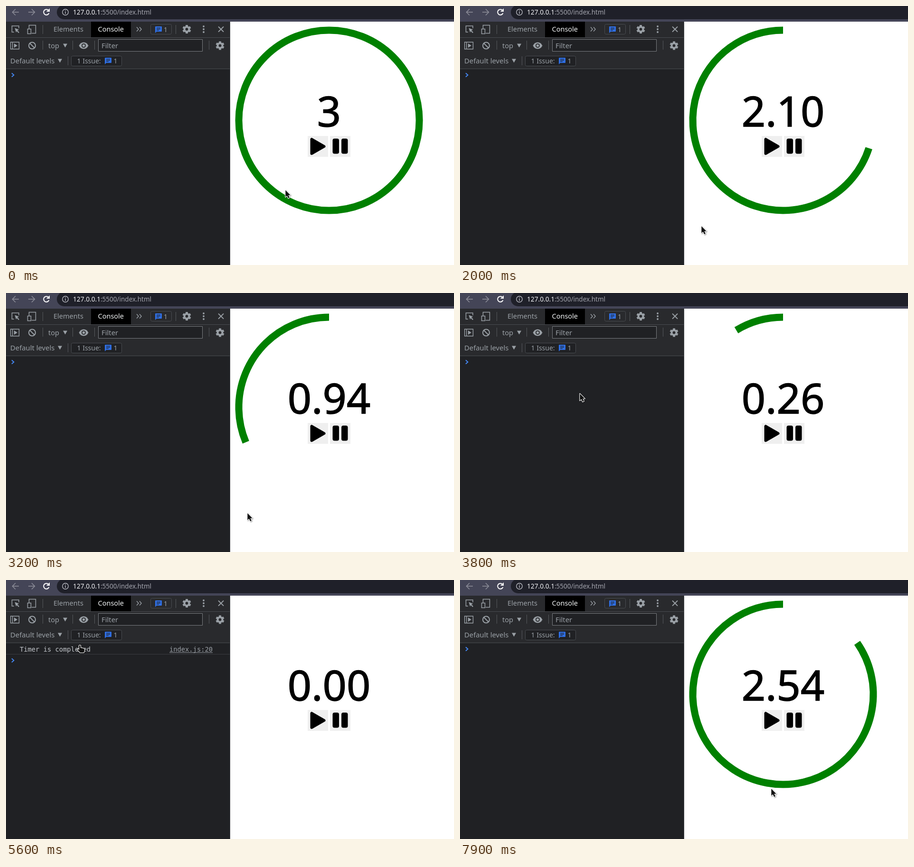
An HTML page with a canvas for the animation above (8 s loop, 943 px wide and 546 px high).

```html
<!DOCTYPE html>
<html lang="en">
<head>
<meta charset="utf-8">
<title>Countdown timer</title>
<style>
html, body { margin: 0; width: 100%; height: 100%; overflow: hidden; background: #202124; }
canvas { display: block; width: 943px; height: 546px; }
</style>
</head>
<body>
<canvas id="stage" width="943" height="546"></canvas>
<script>
const ctx = document.getElementById('stage').getContext('2d');
const LOOP = 8000, STEP = 100;
const FIRST = 1100, DONE = 4100, RELOAD = 6300, SECOND = 7440;
const SANS = '"Noto Sans", "Open Sans", sans-serif';
const MONO = '"DejaVu Sans Mono", monospace';
const GREY = '#9aa0a6', EDGE = '#494c50', DARK = '#202124', BLUE = '#2f6fe4';

// Countdown: ms since the click, seconds left
const COUNT = [[0, 3], [900, 2.1], [2100, 0.94], [2700, 0.26], [2960, 0]];
// Pointer moves: departure, arrival, x, y
const START = { x: 588, y: 388 };
const MOVES = [
  [100, 600, 641, 316], [700, 900, 646, 302], [FIRST, 2000, 508, 464],
  [3200, 3800, 252, 212], [3800, 4300, 160, 163], [4400, 4900, 87, 14],
  [5300, 5600, 154, 137], [5600, 5800, 221, 176], [5900, 6200, 87, 14],
  [RELOAD, 6500, 114, 74], [6500, 7200, 648, 300], [7400, 7900, 655, 440]
];

const mix = (a, b, k) => a + (b - a) * k;
const part = (t, from, to) => Math.min(1, Math.max(0, (t - from) / (to - from)));

function secondsLeft(ms) {
  let left = 3;
  for (let i = 1; i < COUNT.length; i++) {
    left = mix(left, COUNT[i][1], part(ms, COUNT[i - 1][0], COUNT[i][0]));
  }
  return Math.round(left * 50) / 50;
}

function pointerAt(t) {
  return MOVES.reduce((p, [from, to, x, y]) => {
    const k = part(t, from, to);
    return { x: mix(p.x, x, k), y: mix(p.y, y, k) };
  }, START);
}

function rect(x, y, w, h, color) {
  ctx.fillStyle = color;
  ctx.fillRect(x, y, w, h);
}

function paint(fill, stroke, width) {
  if (fill) { ctx.fillStyle = fill; ctx.fill(); }
  if (stroke) { ctx.strokeStyle = stroke; ctx.lineWidth = width; ctx.stroke(); }
}

function round(x, y, w, h, r, fill, stroke, width = 1) {
  ctx.beginPath();
  ctx.roundRect(x, y, w, h, r);
  paint(fill, stroke, width);
}

function line(points, color, width = 1.6) {
  ctx.beginPath();
  points.forEach(([x, y]) => ctx.lineTo(x, y));
  paint(null, color, width);
}

function circle(x, y, r, fill, stroke, width) {
  ctx.beginPath();
  ctx.arc(x, y, r, 0, Math.PI * 2);
  paint(fill, stroke, width);
}

function text(s, x, y, size, color, family = SANS, align = 'left') {
  ctx.font = size + 'px ' + family;
  ctx.textAlign = align;
  ctx.fillStyle = color;
  ctx.fillText(s, x, y);
}

function shape(d, x, y, fill, stroke, width) {
  const p = new Path2D(d);
  ctx.save();
  ctx.translate(x, y);
  ctx.lineJoin = 'round';
  if (stroke) { ctx.strokeStyle = stroke; ctx.lineWidth = width; ctx.stroke(p); }
  if (fill) { ctx.fillStyle = fill; ctx.fill(p); }
  ctx.restore();
}

// An open angle: two strokes of slope h/w meeting at x, y
function angle(x, y, w, h, color, width) {
  line([[x - w, y - h], [x, y], [x - w, y + h]], color, width);
}

function gear(x, y) {
  for (let i = 0; i < 6; i++) {
    ctx.save();
    ctx.translate(x, y);
    ctx.rotate(i * Math.PI / 3);
    rect(-2.4, -9, 4.8, 5, GREY);
    ctx.restore();
  }
  circle(x, y, 4.9, null, GREY, 4);
}

function bubble(x, y) {
  shape('M1 0H13Q14 0 14 1V10Q14 11 13 11H3L0 14V1Q0 0 1 0Z', x, y, BLUE);
  for (let i = 0; i < 3; i++) rect(x + 3, y + 2.5 + i * 2.5, i < 2 ? 8 : 5, 1.1, DARK);
}

function drop(x, y) {
  shape('M0 0H9L4.5 8Z', x, y, GREY);
}

function browserBar(hover) {
  rect(0, 0, 943, 33, '#444557');
  round(107, -2, 860, 30, 15, '#1f2029');
  for (const [x, dir] of [[20, 1], [54, -1]]) {
    line([[x + 7 * dir, 13], [x - 6 * dir, 13]], '#8c8d98');
    angle(x - 6.5 * dir, 13, -6.5 * dir, 6.5, '#8c8d98', 1.6);
  }
  if (hover) circle(85, 13, 13.5, '#686977');
  ctx.beginPath();
  ctx.arc(85, 13, 5.8, .35, Math.PI * 1.75);
  paint(null, '#fff', 2);
  shape('M7 -7V0H0Z', 85, 12, '#fff');
  circle(125, 13, 6.2, null, '#b9bac2', 1.4);
  rect(124.3, 12, 1.5, 4.5, '#b9bac2');
  rect(124.3, 9.3, 1.5, 1.6, '#b9bac2');
  text('127.0.0.1', 141, 18, 13.7, '#f1f1f4');
  const w = ctx.measureText('127.0.0.1').width;
  text(':5500/index.html', 141 + w, 18, 13.5, '#a3a4ad');
}

function panel() {
  rect(0, 33, 472, 513, DARK);
  rect(0, 33, 471, 99, '#292a2d');
  rect(179, 33, 84, 33, '#000');
  for (const y of [66, 132]) rect(0, y, 471, 1, EDGE);
  rect(471, 33, 1, 513, EDGE);
  [[77, 357], [77, 140, 186, 427], [130]].forEach((row, i) =>
    row.forEach(x => rect(x, 40 + i * 33, 1, 19, '#55585c')));
}

function tabRow() {
  line([[17, 55], [12.5, 55], [12.5, 42], [27, 42], [27, 47]], GREY, 1.5);
  shape('M0 0L9 3.5L5.5 5L9.5 9L8 10.5L4 6.5L2.8 9.5Z', 18.5, 46.5, GREY);
  line([[48.5, 48], [48.5, 40.5], [62.5, 40.5], [62.5, 57.5], [54, 57.5]], GREY, 1.5);
  round(45.5, 48.5, 7, 10, 0, null, GREY, 1.5);
  text('Elements', 100, 54, 14.5, GREY);
  text('Console', 193.5, 54, 14.5, '#f1f3f4');
  for (const x of [279, 285]) angle(x, 49, 4, 4.5, GREY, 1.4);
  round(304.5, 38.5, 44, 21, 3, null, EDGE);
  bubble(314, 43);
  text('1', 332, 54.5, 14, GREY);
  gear(380.5, 49);
  for (let i = -1; i < 2; i++) circle(416, 49 + i * 6, 1.9, GREY);
  for (const d of [-5.5, 5.5]) line([[452.5 - d, 43.5], [452.5 + d, 54.5]], GREY, 1.8);
}

function filterRow() {
  round(9.7, 76.2, 17.8, 14.6, 0, null, GREY, 1.4);
  rect(13, 76, 1.4, 15, GREY);
  shape('M0 0L7 4.5L0 9Z', 17, 79, GREY);
  circle(55, 83.5, 7, null, GREY, 2);
  line([[50, 78.5], [60, 88.5]], GREY, 2);
  text('top', 89, 88.5, 14.6, GREY);
  drop(120, 79.5);
  shape('M0 7Q3.5 0 10 0Q16.5 0 20 7Q16.5 14 10 14Q3.5 14 0 7Z', 153.5, 76.5, GREY);
  circle(163.5, 83.5, 4.5, '#292a2d');
  circle(163.5, 83.5, 2.7, GREY);
  round(194.5, 70.5, 219, 25, 0, DARK, '#7b7e82');
  text('Filter', 201, 89, 14.8, GREY);
  gear(450.5, 83.5);
}

function levelRow() {
  text('Default levels', 9, 121, 14.8, GREY);
  drop(109, 111.5);
  round(137.5, 105.5, 106, 21, 3, DARK, EDGE);
  text('1 Issue:', 149.5, 121, 14, GREY);
  bubble(208, 109);
  text('1', 226.5, 121, 14, GREY);
}

function consoleBody(logged) {
  if (logged) {
    text('Timer is completed', 29, 151, 13.75, '#c3c7cc', MONO);
    text('index.js:20', 435, 151, 13.75, GREY, MONO, 'right');
    rect(344, 152.5, 91, 1, GREY);
    rect(0, 156, 471, 1, '#3a3c40');
  }
  angle(16.5, logged ? 169.5 : 145.5, 4.5, 4, '#4488f5', 1.9);
}

function page(left) {
  rect(472, 33, 471, 513, '#fff');
  if (left > 0) {
    const top = -Math.PI / 2;
    ctx.beginPath();
    ctx.arc(680, 241, 190, top + (1 - left / 3) * Math.PI * 2, top + Math.PI * 2);
    paint(null, '#008000', 15);
  }
  const label = left === 3 ? '3' : left.toFixed(2);
  text(label, 680, 254, 88, '#000', SANS, 'center');
  ctx.strokeStyle = '#000';
  ctx.lineWidth = 1.4;
  ctx.strokeText(label, 680, 254);
  for (const x of [635, 682]) rect(x, 274, 43, 44, '#efefef');
  shape('M0 0V30L26 15Z', 643.5, 281, '#000', '#000', 6);
  for (const x of [687.5, 706]) round(x, 279.5, 13.5, 32, 4, '#000');
}

const ARROW = 'M.3 .3V14.7L3.6 11.7L6.2 17.3L8.8 16.1L6.3 10.7H10.7Z';
const HAND = 'M0 1.5Q1.5 -.5 3 1.5V6.5Q5 5.3 6 7Q8 6 9 7.6Q11 7.3 11 9.5V12Q11 14 9.5 16H2Q.5 13.5 -3.5 10.5Q-4 8.5 -2 8.7L0 10Z';

function pointer({ x, y }, hand) {
  const outline = hand ? HAND : ARROW;
  x = Math.round(x);
  y = Math.round(y);
  ctx.save();
  ctx.shadowColor = 'rgba(0,0,0,.4)';
  ctx.shadowBlur = 2;
  ctx.shadowOffsetX = ctx.shadowOffsetY = 1;
  shape(outline, x, y, null, '#fff', 2.2);
  ctx.restore();
  shape(outline, x, y, '#111');
}

function draw(t) {
  const between = (a, b) => t >= a && t < b;
  const reloading = between(6100, 6600);
  browserBar(between(4800, 5400) || reloading);
  panel();
  tabRow();
  filterRow();
  levelRow();
  consoleBody(between(DONE, RELOAD));
  page(secondsLeft(t - (t < RELOAD ? FIRST : SECOND)));
  pointer(pointerAt(t), between(4800, 5700) || reloading);
}

function tick(now) {
  draw(Math.floor(now % LOOP / STEP) * STEP);
  requestAnimationFrame(tick);
}
draw(0);
requestAnimationFrame(tick);
</script>
</body>
</html>
```
